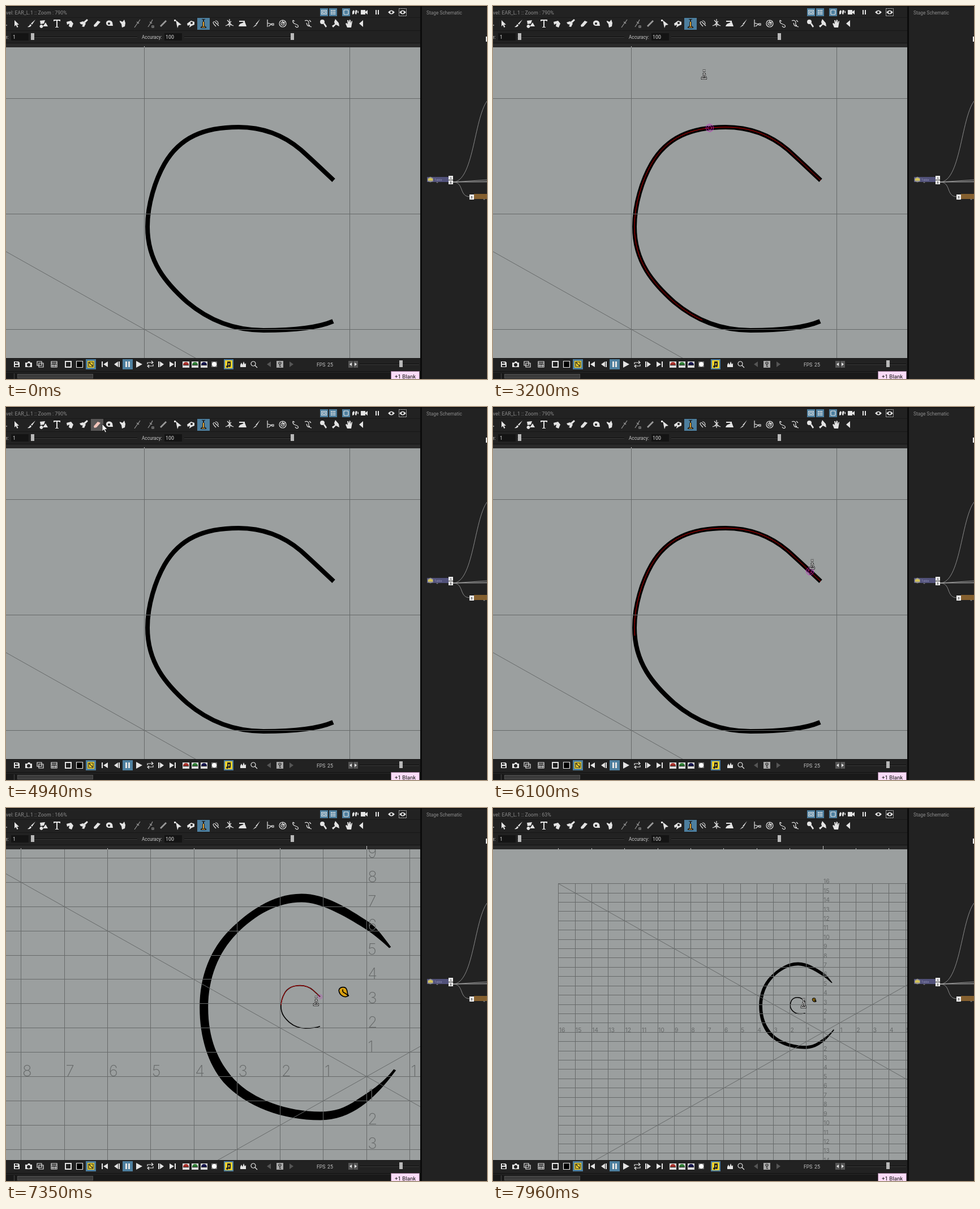
Recreate the animation shown at these times as an HTML page with a canvas. Size 850x659 px, loop 8 s.

```html
<!DOCTYPE html>
<html lang="en">
<head>
<meta charset="utf-8">
<title>Pinch tool</title>
<style>
html, body { margin: 0; width: 100%; height: 100%; overflow: hidden; background: #222; }
canvas { display: block; }
</style>
</head>
<body>
<canvas id="stage" width="850" height="659"></canvas>
<script>
const ctx = document.getElementById('stage').getContext('2d');
const LOOP = 8000;
const UI = 'Roboto, "Open Sans", sans-serif';
const BLUE = '#4d7f9f', PANEL = '#222222', VIEWER = '#9b9f9f', GRID = '#676a6a', YELLOW = '#f3d32b';

// ---- Drawing helpers ----
function rect(x, y, w, h, color) {
  ctx.fillStyle = color;
  ctx.fillRect(x, y, w, h);
}
function label(text, x, y, size, color, font = UI) {
  ctx.font = `${size}px ${font}`;
  ctx.fillStyle = color;
  ctx.fillText(text, x, y);
}
function stroke(path, color, width) {
  ctx.strokeStyle = color;
  ctx.lineWidth = width;
  ctx.stroke(path);
}
function icon(x, y, d, filled, color = '#e4e4e4') {
  const path = new Path2D(d);
  ctx.save();
  ctx.translate(x, y);
  if (filled) { ctx.fillStyle = color; ctx.fill(path, 'evenodd'); }
  else stroke(path, color, 1.2);
  ctx.restore();
}
function slider(x1, x2, y, knob) {
  rect(x1, y, x2 - x1, 1, '#0c0c0c');
  rect(x1, y + 1, x2 - x1, 1, '#3c3c3c');
  rect(knob, y - 6, 6, 12, '#b8b8b8');
}

// ---- Toolbars: [x, path, filled, color] ----
const ARROW = 'M-3-6V5L-.5 2.5L1.5 7L3.5 6L1.5 2H5Z';
const ERASER = 'M-6 3L1-5L6-3L-1 5L-5 6Z';
const tools = [
  [2, 'M-4 3H0', 0],
  [18, ARROW, 1],
  [45, 'M7-7L-1 0L1 2ZM-2 1L0 3Q-2 7-7 6Q-4 5-2 1Z', 1],
  [67, 'M-7-5L2-6L0 0L-6 1ZM3-2L7 5H-2ZM-5 2A3 3 0 1 0-4 2Z', 1],
  [90, 'M-6-7H6V-4H5L4-5H1V6H3V7H-3V6H-1V-5H-4L-5-4H-6Z', 1],
  [113, 'M-6-3L2-5L6 0L3 7L-2 5L-1 0L-5 2Z', 1],
  [137, 'M6-8L8-6L3-1L0-3ZM-7-2L-1-4L4 0L1 6L-3 5L-1 2L-5 1Z', 1],
  [161, ERASER, 1],
  [183, 'M-6 0A5 4 0 0 1 5-2L6 4H-1A5 4 0 0 1-6 0ZM-3 0A2 2 0 1 0 1 0A2 2 0 1 0-3 0Z', 1],
  [207, 'M-6-5L-1-3L2-7L4-1L3 5L-2 7L-3 1L-6-3Z', 1],
  [232, 'M5-7L1-1M2-3L-5 7M-1-3L3 0', 0, '#999'],
  [255, 'M4-7L1-1M2-3L-4 6M-1-3L3 0M3 4H6V7H3Z', 0, '#999'],
  [278, 'M-6 4L4-6L6-4L-4 6Z', 1, '#999'],
  [304, 'M-4-6L6 2L1 3L-1 8ZM-7-7H-4V-4H-7Z', 1],
  [327, 'M-7 0L0-5L6-3V2L1 4L-3 7L-2 2L-6 4ZM-1-1A2 2 0 1 0 3-1A2 2 0 1 0-1-1Z', 1],
  [349, 'M-3-8H3V-7H1V-3H2V4L5 6V8H-5V6L-2 4V-3H-1V-7H-3Z', 1, '#1c1c1c'],
  [349, 'M-1-3H1V5H-1ZM-3 6H3V7H-3Z', 1, '#e3a93c'],
  [371, 'M5 4L-1-2Q-3-5-5-2Q-5 0 0 5M-1-5Q4-5 4 1', 0],
  [395, 'M-7 4Q0 0 7 4M0-8V6M-4-6L4 3M-4 3L3-4', 0],
  [418, 'M-6-5H4V-3L6 2L7 5H-7Q-6 0 0-1L2-3H-6Z', 1],
  [442, 'M7-8L1 2L-1 1ZM-1 2L1 3L-6 7Z', 1],
  [467, 'M-5-7V6M-5-1L2 1L-3 5M3 0H6V3H3Z', 0],
  [489, 'M-6 0A6 6 0 1 0 6 0A6 6 0 1 0-6 0M-3 0A3 3 0 1 0 3 0A3 3 0 1 0-3 0M0-6V0L4-3', 0],
  [512, 'M-5-6Q-6 0 0 1Q6 3 4 6Q1 8-1 4M-5-6L-2-4', 0],
  [534, 'M-6-5Q0-7 1-2Q0 3 3 5L6 6M-3-1Q-1 7 3 3M2-6L5-3', 0],
  [560, 'M-5-3A4 4 0 1 0 3-3A4 4 0 1 0-5-3ZM1 1L3-1L7 5L5 7Z', 1],
  [583, 'M-1-8L5-1L6 5L0 2L-5 7L-7 4L-2 1L-3-3Z', 1],
  [606, 'M-3 7L-6 0L-4-1L-2 1L-3-6L-1-6L0-2L1-7L3-6V-1L5-5L6-4L4 7Z', 1],
  [628, 'M3-6V6L-4 0Z', 1],
];
const EYE = 'M-6 0Q0-7 6 0Q0 7-6 0ZM-2 0A2 2 0 1 0 2 0A2 2 0 1 0-2 0Z';
const viewIcons = [
  [562, 'M-5-4H5V4H-5ZM-4-3H4V3H-4ZM-3-2H3V2H-3ZM-2-1H2V1H-2Z', 1],
  [578, 'M-4-4H-2V-2H-4ZM-1-4H1V-2H-1ZM2-4H4V-2H2ZM-4-1H-2V1H-4ZM-1-1H1V1H-1ZM2-1H4V1H2ZM-4 2H-2V4H-4ZM-1 2H1V4H-1ZM2 2H4V4H2Z', 1],
  [601, 'M-4-3L-3-4H3L4-3V3L3 4H-3L-4 3Z', 0],
  [617, 'M-5-1L-3-4L-1-2L-2 3L-5 4ZM0-1L1-4L4-3L2 4L0 3ZM4 0L6-3V2Z', 1],
  [633, 'M-6-4H2V-1L6-4V4L2 1V4H-6Z', 1],
  [656, 'M-3-4H-1V4H-3ZM1-4H3V4H1Z', 1],
  [681, EYE, 1], [701, EYE, 1],
];
const TRI = 'M-5-6L6 0L-5 6Z', BACK = 'M4-5V5L-3 0Z', FORTH = 'M-4-5V5L3 0Z';
const FRAME = 'M-6-6H6V6H-6ZM-4-4H4V4H-4Z';
const playIcons = [
  [19, 'M-5-5H3L5-3V5H-5ZM-3-4V-1H2V-4ZM-3 1V4H3V1ZM0-4H1V-2H0Z', 1],
  [40, 'M-6-3H-2L-1-5H2L3-3H6V5H-6ZM-3 1A3 3 0 1 0 3 1A3 3 0 1 0-3 1Z', 1],
  [60, 'M-5-5H3V2H-5ZM-2-2H6V5H-2Z', 0],
  [85, 'M-5-5H5V5H-5ZM-5-2H5M-2 0V5M2 0V5M-5 2H5', 0],
  [110, FRAME, 1], [130, 'M-5.5-5.5H5.5V5.5H-5.5Z', 0],
  [150, 'M-4-4H4V4H-4ZM-3-3L3 3', 0, '#222'],
  [175, 'M-6-5H-4V5H-6ZM5-5V5L-3 0Z', 1],
  [196, 'M2-5V5L-5 0ZM3-5H5V5H3Z', 1],
  [215, 'M-4-5H-1V5H-4ZM1-5H4V5H1Z', 1],
  [235, TRI, 1],
  [255, 'M-5 0V-3H4M2-6L5-3L2-1M5 0V3H-4M-2 1L-5 3L-2 6', 0],
  [274, 'M-5-5H-3V5H-5ZM-2-5V5L5 0Z', 1],
  [294, 'M-5-5V5L3 0ZM4-5H6V5H4Z', 1],
  [368, 'M-5-5H5V5H-5Z', 1, '#777'], [368, 'M-4 0A4 4 0 1 0 4 0A4 4 0 1 0-4 0Z', 1, '#fff'],
  [393, 'M-2-5H4V3A2 2 0 1 1 2 1V-2H0V4A2 2 0 1 1-2 2Z', 1, '#222'],
  [419, 'M-5 5V1L-3-3L-1 1L1-5L3 0L5-2V5Z', 1],
  [438, 'M-5-1A4 4 0 1 0 3-1A4 4 0 1 0-5-1M2 2L6 6', 0],
  [464, BACK, 1, '#555'], [505, FORTH, 1, '#555'],
  [484, 'M-6-6H6V6H-6Z', 1, '#a8a8a8'],
  [484, 'M-2-2A2 2 0 1 0 2-2A2 2 0 1 0-2-2M0 0V4H2', 0, '#222'],
];

function drawToolbars(zoom, pointer) {
  rect(0, 0, 733, 73, PANEL);
  rect(0, 0, 850, 2, '#151515');
  rect(0, 20, 733, 1, '#191919');
  rect(0, 43, 733, 1, '#181818');
  rect(0, 65, 733, 1, '#141414');
  rect(0, 66, 733, 7, '#292929');
  label(`vel: EAR_L.1 :: Zoom : ${zoom}%`, 0, 14.5, 8.9, '#8c8c8c');

  for (const x of [555, 571, 594]) rect(x, 4, 14, 14, BLUE);
  for (const [x, d, filled] of viewIcons) icon(x, 11, d, filled);
  ctx.setLineDash([2, 1]);
  ctx.strokeStyle = '#ccc';
  ctx.lineWidth = 1;
  ctx.strokeRect(694.5, 4.5, 13, 13);
  ctx.setLineDash([]);

  rect(338, 21, 22, 21, BLUE);
  for (const [x, d, filled, color] of tools) {
    const hover = pointer && Math.abs(pointer.x - x) < 11 && Math.abs(pointer.y - 31) < 11;
    if (hover) rect(x - 11, 21, 22, 21, '#595757');
    icon(x, 31, d, filled, hover && d === ERASER ? '#f3c5bb' : color);
  }

  label('e:', -2, 58, 8.5, '#c8c8c8');
  rect(9, 48, 31, 13, '#141414');
  label('1', 12, 58, 8.8, '#ddd');
  slider(43, 232, 54, 44);
  label('Accuracy:', 240, 58, 8.2, '#c8c8c8');
  rect(280, 48, 31, 13, '#141414');
  label('100', 282, 58, 8.8, '#ddd');
  slider(315, 508, 54, 503);
}

function drawPlaybar() {
  rect(0, 622, 733, 37, PANEL);
  rect(0, 622, 733, 1, '#151515');
  rect(0, 645, 733, 1, '#111');
  rect(125, 628, 10, 10, '#000');
  rect(141, 624, 18, 18, BLUE);
  rect(144, 627, 12, 12, YELLOW);
  rect(206, 624, 18, 18, BLUE);
  rect(385, 624, 17, 18, BLUE);
  rect(387, 626, 13, 14, YELLOW);
  ['#a8312b', '#2f7d34', '#16164c'].forEach((color, i) => {
    const x = 318 + 16 * i;
    rect(x - 6, 628, 12, 11, '#ddd');
    icon(x, 633, 'M-5 1A5 5 0 0 1 5 1Z', 1, color);
    rect(x - 5, 634, 10, 1, '#222');
  });
  for (const [x, d, filled, color] of playIcons) icon(x, 633, d, filled, color);
  label('FPS', 549, 637, 8.6, '#c4c4c4');
  label('25', 568, 637, 8.8, '#c4c4c4');
  rect(605, 627, 8, 12, '#555');
  rect(614, 627, 8, 12, '#555');
  icon(609, 633, 'M2-3V3L-2 0Z', 1);
  icon(618, 633, 'M-2-3V3L2 0Z', 1);
  slider(625, 730, 632, 695);

  rect(0, 648, 680, 11, '#191919');
  rect(14, 649, 1, 10, '#444');
  rect(20, 650, 134, 8, '#505050');
  rect(21, 651, 132, 6, '#3b3b3b');
  rect(680, 645, 51, 14, '#8b6b86');
  rect(681, 646, 49, 13, '#fbdcf8');
  label('+1 Blank', 687, 658, 9.7, '#111');
}

function drawSchematic() {
  rect(732, 0, 3, 659, '#0b0b0b');
  rect(735, 2, 115, 657, PANEL);
  label('Stage Schematic', 743, 15, 8.4, '#8c8c8c');
  rect(848, 54, 2, 9, '#eee');
  stroke(new Path2D('M790 311C826 311 827 200 850 168M790 311C810 311 800 337 820 337M790 311L850 307M790 311L850 309.5M790 311H850'), '#a5a5a5', 0.8);
  rect(744, 302, 38, 9, '#515179');
  icon(750, 306.5, 'M-5-2L0-5L5-2V3L0 5L-5 3Z', 1, '#8f8f8f');
  icon(750, 306.5, 'M-4-1L0-3L4-1V2H-4Z', 1, '#d5c45a');
  label('Table', 757, 309, 5.5, '#8c8cb4');
  icon(762, 311, 'M-2 0H2L0 2Z', 1, '#777');
  rect(782, 300, 8, 15, '#eee');
  rect(782, 307, 8, 1, '#222');
  label('A', 784.5, 306, 5, '#222');
  label('B', 784.5, 314, 5, '#222');
  rect(827, 332, 23, 9, '#85602f');
  icon(845, 341, 'M-2 0H2L0 2Z', 1, '#777');
  rect(819, 333, 8, 9, '#eee');
  label('B', 821.5, 340, 5, '#222');
}

// ---- Artwork in viewer pixels at the starting zoom ----
const ORIGIN = { x: 970, y: 979 }, UNIT = { x: 363, y: 204 };
const CURVE = 'M579 308C560 290 540 271 521 254C488 226 452 214 411 214C350 214 307 232 280 279C264 307 250 350 250 390C250 452 283 490 320 523C365 561 412 573 455 573C505 573 550 569 578 557';
const curve = new Path2D(CURVE);
const REACH = 457;
const probe = document.createElementNS('http://www.w3.org/2000/svg', 'path');
probe.setAttribute('d', CURVE);
const curveLength = probe.getTotalLength();
const samples = Array.from({ length: Math.ceil(curveLength) }, (_, s) => {
  const { x, y } = probe.getPointAtLength(s);
  return { s, x, y };
});
const nearest = p => samples.reduce((best, q) =>
  Math.hypot(q.x - p.x, q.y - p.y) < Math.hypot(best.x - p.x, best.y - p.y) ? q : best);

// Head and nose are laid out at the middle zoom, around its own origin.
const HEAD_SCALE = Math.exp(1.56), HEAD_ORIGIN = { x: 637, y: 474 };
const head = new Path2D('M680 245C666 226 656 212 641 201C603 176 564 151 522 151C470 151 425 185 395 215C362 248 342 295 342 352C342 405 357 452 384 484C424 528 490 551 555 551C610 551 650 515 689 463L685 461C665 487 640 502 620 515C598 530 580 536 555 536C498 536 437 515 403 479C374 447 357 407 357 352C357 300 375 255 407 222C440 188 480 166 522 166C556 166 598 190 633 212C652 224 665 236 677 247Z');
const nose = new Path2D('M588 322C589 315 600 314 602 321C604 325 602 328 605 331C599 336 589 331 588 322Z');
const noseLine = new Path2D('M595 320C593 327 600 325 605 332');

// ---- View: each wheel click zooms out around the pointer ----
const CLICK = 0.12;
const wheel = [[6800, 2], [6880, 2], [6950, 2], [7030, 1], [7200, 2], [7280, 2], [7350, 2],
  [7580, 2], [7650, 3], [7730, 2], [7960, 1]];

function viewAt(t) {
  const clicks = wheel.reduce((sum, [time, n]) => sum + (t >= time ? n : 0), 0);
  const view = { ...ORIGIN, s: 1 };
  const zoomAbout = (px, py, n) => {
    const f = Math.exp(-CLICK * n);
    view.x = px + (view.x - px) * f;
    view.y = py + (view.y - py) * f;
    view.s *= f;
  };
  zoomAbout(548.7, 340.2, Math.min(clicks, 13));
  zoomAbout(549.6, 347.8, Math.max(clicks - 13, 0));
  return view;
}

// ---- Pointer path: [time, x, y] ----
const track = [
  [250, 738, 345], [450, 600, 300], [700, 440, 248], [1050, 562, 284], [1170, 566, 288],
  [1270, 566, 288], [1550, 537, 272], [1660, 537, 272], [2100, 592, 312], [2420, 592, 313],
  [2700, 500, 220], [3020, 372, 122], [3130, 372, 122], [3200, 373, 129], [3260, 373, 129],
  [3550, 250, 84], [3750, 115, 18], [3950, 84, 13], [4200, 112, 13], [4640, 90, 14], [4720, 90, 14],
  [4940, 170, 30], [5020, 170, 30], [5300, 420, 150], [5560, 588, 303], [5750, 588, 300],
  [6100, 564, 286], [6350, 562, 284], [6720, 548, 348], [7400, 548, 349], [7730, 549, 353],
];
function pointerAt(t) {
  const i = track.findIndex(key => key[0] > t);
  if (i === 0) return null;
  if (i < 0) return { x: track.at(-1)[1], y: track.at(-1)[2] };
  const [t0, x0, y0] = track[i - 1], [t1, x1, y1] = track[i];
  const k = (t - t0) / (t1 - t0);
  return { x: x0 + (x1 - x0) * k, y: y0 + (y1 - y0) * k };
}

function drawGrid({ x, y, s }) {
  const gx = UNIT.x * s, gy = UNIT.y * s;
  const left = x - 16 * gx, top = y - 16 * gy, w = 32 * gx, h = 32 * gy;
  const size = 131 * s;
  const font = 'Inter, Roboto, sans-serif';
  const weight = size < 16 ? 400 : 200;
  for (let i = -16; i <= 16; i++) {
    rect(Math.floor(x + i * gx), Math.floor(top), 1, h, GRID);
    rect(Math.floor(left), Math.floor(y + i * gy), w, 1, GRID);
    if (!i) continue;
    const n = Math.abs(i);
    label(n, x + i * gx + 10 * s, y - 4 * s, `${weight} ${size}`, GRID, font);
    label(n, x + 10 * s, y + i * gy - 4 * s, `${weight} ${size}`, GRID, font);
  }
  stroke(new Path2D(`M${left} ${top}L${left + w} ${top + h}M${left} ${top + h}L${left + w} ${top}`), GRID, 1);
}

function drawViewer(view, pointer) {
  ctx.save();
  ctx.beginPath();
  ctx.rect(0, 73, 733, 549);
  ctx.clip();
  rect(0, 73, 733, 549, VIEWER);

  ctx.save();
  ctx.translate(view.x, view.y);
  ctx.scale(view.s, view.s);
  ctx.save();
  ctx.scale(HEAD_SCALE, HEAD_SCALE);
  ctx.translate(-HEAD_ORIGIN.x, -HEAD_ORIGIN.y);
  ctx.fillStyle = '#000';
  ctx.fill(head);
  ctx.fillStyle = '#d9a010';
  ctx.fill(nose);
  const outline = Math.max(1.7, 1.3 / (view.s * HEAD_SCALE));
  stroke(nose, '#000', outline);
  stroke(noseLine, '#000', outline);
  ctx.restore();

  ctx.translate(-ORIGIN.x, -ORIGIN.y);
  stroke(curve, '#000', Math.max(8, 1.5 / view.s));
  let grip = null;
  if (pointer) {
    grip = nearest({
      x: ORIGIN.x + (pointer.x - view.x) / view.s,
      y: ORIGIN.y + (pointer.y - view.y) / view.s,
    });
    const from = Math.max(0, grip.s - REACH), to = Math.min(curveLength, grip.s + REACH);
    ctx.setLineDash([0, from, to - from, 9999]);
    stroke(curve, '#e00000', 0.9 / view.s);
    ctx.setLineDash([]);
  }
  ctx.restore();

  drawGrid(view);
  if (grip) {
    const ring = new Path2D();
    const x = view.x + (grip.x - ORIGIN.x) * view.s, y = view.y + (grip.y - ORIGIN.y) * view.s;
    const size = view.s < 0.5 ? 0.6 : 1;
    for (const r of [6.5, 3.5]) {
      ring.moveTo(x + r * size, y);
      ring.arc(x, y, r * size, 0, 2 * Math.PI);
    }
    ctx.globalAlpha = size;
    stroke(ring, '#c321c3', size);
  }
  ctx.restore();
}

function drawRuler({ x, s }) {
  for (let i = -16; i <= 16; i += 2) {
    const tick = Math.floor(x + i * UNIT.x * s);
    if (tick < 732) rect(tick, i ? 71 : 67, 1, i ? 2 : 6, '#c8c8c8');
  }
}

const pump = new Path2D('M-2.5-7.5H3M0-7.5V-1M-1-1H1.5V4L3.5 5.5V7.5H-4V5.5L-1 4Z');
const arrow = new Path2D('M0 0V13L3 10.2L5.2 15L7.3 14L5.2 9.5H9.3Z');
function drawPointer({ x, y }, inViewer) {
  ctx.save();
  ctx.translate(x, inViewer ? y - 8 : y);
  if (inViewer) {
    stroke(pump, '#111', 2.6);
    stroke(pump, '#f4f4f4', 1);
  } else {
    ctx.fillStyle = '#fff';
    ctx.fill(arrow);
    stroke(arrow, '#111', 0.8);
  }
  ctx.restore();
}

function draw(t) {
  const view = viewAt(t), pointer = pointerAt(t);
  const inViewer = pointer && pointer.y > 74 && pointer.x < 733;
  drawViewer(view, inViewer && t < 7580 ? pointer : null);
  drawToolbars(Math.floor(790.5 * view.s), pointer);
  drawRuler(view);
  drawPlaybar();
  drawSchematic();
  if (pointer) drawPointer(pointer, inViewer);
}

const start = performance.now();
function frame() {
  draw((performance.now() - start) % LOOP);
  requestAnimationFrame(frame);
}
frame();
</script>
</body>
</html>
```
